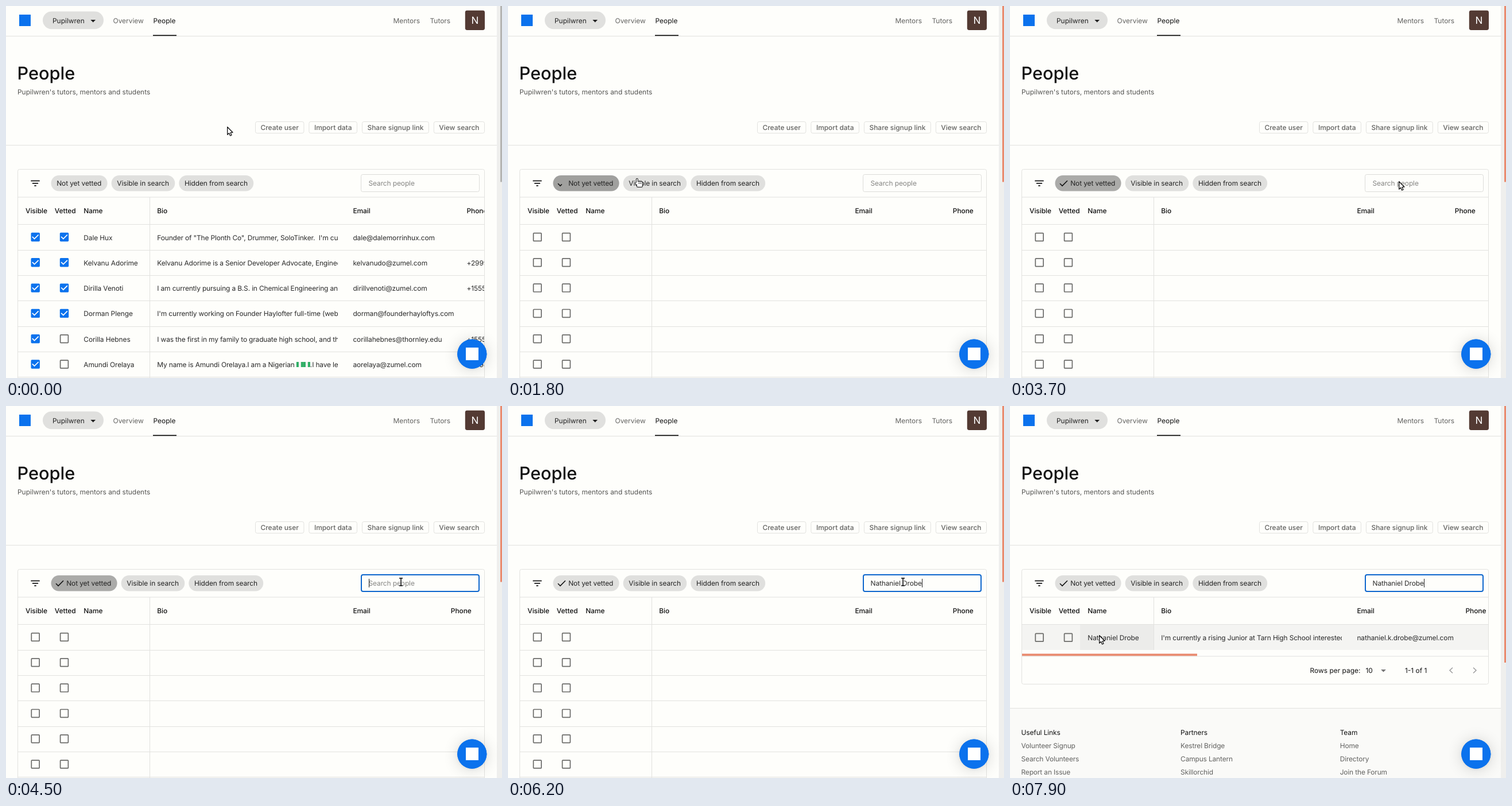
Recreate the animation shown at these times as an HTML page with a canvas. Size 864x648 px, loop 8 s.

```html
<!DOCTYPE html>
<html lang="en">
<head>
<meta charset="utf-8">
<title>People</title>
<style>
  html, body { margin: 0; width: 100%; height: 100%; overflow: hidden; background: #fefefb; }
  canvas { display: block; width: 864px; height: 648px; }
</style>
</head>
<body>
<canvas id="stage" width="864" height="648"></canvas>
<script>
const ctx = document.getElementById('stage').getContext('2d');
const LOOP = 8000, STEP = 100;
const SELECTED = 1800, FOCUSED = 4400, TYPING = 5200, FOUND = 7000;
const BG = '#fefefb', LINE = '#e2e2df', CHIP = '#e0e0de', BLUE = '#0b72ed';
const INK = '#111', BODY = '#2a2a2a', GREY = '#626260', ACCENT = '#e98a6e';
const LEFT = 20, RIGHT = 834, PAGE = 855, ROW = 44.3, ROW_TOP = 380;
const COL = { visible: 34, vetted: 84.8, name: 135.3, bio: 263.3, email: 604.4 };

const PEOPLE = [
  { name: 'Dale Hux', vetted: true, phone: '', email: 'dale@dalemorrinhux.com',
    bio: 'Founder of "The Plonth Co", Drummer, SoloTinker.  I\'m currently' },
  { name: 'Kelvanu Adorime', vetted: true, phone: '+2999', email: 'kelvanudo@zumel.com',
    bio: 'Kelvanu Adorime is a Senior Developer Advocate, Engineer' },
  { name: 'Dirilla Venoti', vetted: true, phone: '+1555', email: 'dirillvenoti@zumel.com',
    bio: 'I am currently pursuing a B.S. in Chemical Engineering and am' },
  { name: 'Dorman Plenge', vetted: true, phone: '', email: 'dorman@founderhayloftys.com',
    bio: "I'm currently working on Founder Haylofter full-time (web and" },
  { name: 'Corilla Hebnes', vetted: false, phone: '+1555', email: 'corillahebnes@thornley.edu',
    bio: 'I was the first in my family to graduate high school, and this' },
  { name: 'Amundi Orelaya', vetted: false, phone: '+2994', email: 'aorelaya@zumel.com',
    bio: 'My name is Amundi Orelaya.I am a Nigerian ', flags: 2, rest: '.I have learned' }
];
const MATCH = { name: 'Nathaniel Drobe', phone: '', email: 'nathaniel.k.drobe@zumel.com',
  bio: "I'm currently a rising Junior at Tarn High School interested" };
const LINKS = [
  ['Useful Links', 'Volunteer Signup', 'Search Volunteers', 'Report an Issue'],
  ['Partners', 'Kestrel Bridge', 'Campus Lantern', 'Skillorchid'],
  ['Team', 'Home', 'Directory', 'Join the Forum']
];

const HOME = { x: 385, y: 210 };
const MOVES = [
  { from: 100, to: 400, x: 375, y: 217 },
  { from: 900, to: 1200, x: 156, y: 308 },
  { from: 1700, to: 2000, x: 429, y: 281 },
  { from: 2100, to: 2600, x: 677, y: 305 },
  { from: 4100, to: 4200, x: 688, y: 306 },
  { from: 6700, to: 7600, x: 155, y: 399 }
];

const ramp = (t, from, to) => Math.min(1, Math.max(0, (t - from) / (to - from)));
const ease = p => p * p * (3 - 2 * p);

function pointerAt(t) {
  return MOVES.reduce((pos, m) => {
    const p = ease(ramp(t, m.from, m.to));
    return { x: pos.x + (m.x - pos.x) * p, y: pos.y + (m.y - pos.y) * p };
  }, HOME);
}

function chipShade(t) {
  if (t >= 5000) return 224;
  return 224 - 18 * ramp(t, 1100, 1200) - 46 * ramp(t, 1400, 1800) + 11 * ramp(t, 2100, 2300);
}

function typedAt(t) {
  if (t < TYPING) return '';
  const extra = MATCH.name.length - 2;
  return MATCH.name.slice(0, 2 + Math.floor(extra * ramp(t, TYPING, TYPING + 1000)));
}

const TIGHT = { gap: -0.1 };
const CELL = { gap: -0.15 };
const HEAD = { weight: 500, gap: -0.06 };
const MEDIUM = { weight: 500 };

function setFont({ size = 11.95, weight = 400, gap = 0 } = {}) {
  ctx.font = `${weight} ${size}px Inter, sans-serif`;
  ctx.letterSpacing = gap + 'px';
}
function widthOf(s, style) {
  setFont(style);
  return ctx.measureText(s).width;
}
function text(s, x, y, color = BODY, style) {
  setFont(style);
  ctx.fillStyle = color;
  ctx.fillText(s, x, y);
  return x + ctx.measureText(s).width;
}
function rect(x, y, w, h, color) {
  ctx.fillStyle = color;
  ctx.fillRect(x, y, w, h);
}
function round(x, y, w, h, r, fill, stroke, lineWidth = 1) {
  ctx.beginPath();
  ctx.roundRect(x, y, w, h, r);
  if (fill) { ctx.fillStyle = fill; ctx.fill(); }
  if (stroke) { ctx.strokeStyle = stroke; ctx.lineWidth = lineWidth; ctx.stroke(); }
}
function poly(points, { fill, stroke, width = 1, close = false }) {
  ctx.beginPath();
  points.forEach(([x, y]) => ctx.lineTo(x, y));
  if (close) ctx.closePath();
  if (fill) { ctx.fillStyle = fill; ctx.fill(); }
  if (stroke) { ctx.strokeStyle = stroke; ctx.lineWidth = width; ctx.stroke(); }
}
function clipped(x, y, w, h, draw) {
  ctx.save();
  ctx.beginPath();
  ctx.rect(x, y, w, h);
  ctx.clip();
  draw();
  ctx.restore();
}
const triangle = (x, y, color) =>
  poly([[x - 4.4, y], [x + 4.4, y], [x, y + 4.4]], { fill: color });
const chevron = (x, y, dir) =>
  poly([[x - 2.5 * dir, y - 4.8], [x + 2.5 * dir, y], [x - 2.5 * dir, y + 4.8]],
    { stroke: '#999', width: 1.4 });

function header() {
  rect(0, 52, PAGE, 1, LINE);
  rect(23, 15, 20, 20, BLUE);
  round(64, 9.5, 106, 30.7, 15.35, CHIP);
  text('Pupilwren', 81, 30, '#222');
  triangle(151.7, 24, '#222');
  text('Overview', 186.5, 30, GREY);
  text('People', 256.5, 30, INK);
  rect(256, 50.4, 41, 1.7, INK);
  text('Mentors', 674.5, 30, GREY);
  text('Tutors', 738.5, 30, GREY);
  round(799.8, 7.8, 34.2, 34.2, 3.4, '#533a33');
  text('N', 810.4, 31.3, '#fff', { size: 17.1 });

  text('People', 19.5, 128, INK, { size: 30.7, weight: 500 });
  text("Pupilwren's tutors, mentors and students", 20, 154.3, '#555553');
  let x = RIGHT - 0.5;
  for (const label of ['View search', 'Share signup link', 'Import data', 'Create user']) {
    const w = widthOf(label, MEDIUM) + 18;
    x -= w;
    round(x, 201.5, w, 20, 3, null, LINE);
    text(label, x + 9, 216, GREY, MEDIUM);
    x -= 9;
  }
  rect(0, 242, PAGE, 1, LINE);
}

function scrollbar(t) {
  rect(PAGE, 0, 9, 648, '#efefed');
  rect(861, 0, 3, t < FOUND ? 306.5 : 447, t < 700 ? '#b4b4b2' : ACCENT);
}

function toolbar(t) {
  [15.4, 10.2, 3.4].forEach((w, i) => rect(51 - w / 2, 303.7 + 4.3 * i, w, 1.7, INK));

  const selected = t >= SELECTED, shade = Math.round(chipShade(t));
  let x = 78.5;
  ['Not yet vetted', 'Visible in search', 'Hidden from search'].forEach((label, i) => {
    const indent = i === 0 && selected ? 27 : 10;
    const w = widthOf(label, TIGHT) + indent + 10;
    round(x, 295, w, 27.4, 13.7, i ? CHIP : `rgb(${shade},${shade},${shade - 2})`);
    text(label, x + indent - 0.3, 313, '#222', TIGHT);
    x += w + 7;
  });
  if (selected) {
    const reach = 9 * (0.2 + 0.8 * ramp(t, 1700, 2400));
    poly([[87, 309.3], [91, 313.3], [91 + reach, 313.3 - reach]], { stroke: INK, width: 1.6 });
  }

  const focus = t >= FOCUSED, inset = focus ? 0.5 : 0, typed = typedAt(t);
  round(618.5 + inset, 293.5 + inset, 206 - 2 * inset, 30 - 2 * inset, 3, null,
    focus ? '#0d66cd' : '#dcdcd9', focus ? 2 : 1);
  if (!typed) text('Search people', 631.5, 313, '#858583', TIGHT);
  const end = text(typed, 631.5, 313, BODY, TIGHT);
  if (focus) rect(Math.round(end), 301, 1, 15, '#222');
}

function checkbox(cx, cy, checked) {
  if (!checked) {
    round(cx - 6.9, cy - 6.9, 13.8, 13.8, 1, null, '#6b6b69', 1.7);
    return;
  }
  round(cx - 7.7, cy - 7.7, 15.4, 15.4, 1.7, BLUE);
  poly([[cx - 5.4, cy - 0.6], [cx - 1.7, cy + 3.1], [cx + 5.4, cy - 4]],
    { stroke: '#fff', width: 1.7 });
}

function flag(x, y) {
  rect(x, y, 12, 9, '#2fae66');
  rect(x + 4, y, 4, 9, '#f4f4f2');
}

function cells(p, y, phoneX) {
  text(p.name, COL.name, y, BODY, TIGHT);
  clipped(251, y - 20, 327, 30, () => {
    let x = text(p.bio, COL.bio, y, BODY, CELL);
    for (let i = 0; i < (p.flags || 0); i++, x += 12) flag(x, y - 9);
    if (p.rest) text(p.rest, x, y, BODY, CELL);
  });
  text(p.email, COL.email, y, BODY, TIGHT);
  text(p.phone, phoneX, y, BODY, TIGHT);
}

function columns(phoneX) {
  for (const [key, x] of Object.entries({ ...COL, phone: phoneX })) {
    text(key[0].toUpperCase() + key.slice(1), x, 361.4, INK, HEAD);
  }
}

function list(loading) {
  const phoneX = loading ? 774.8 : 802.5;
  clipped(LEFT, 333, RIGHT - LEFT - 1, 315, () => {
    columns(phoneX);
    PEOPLE.forEach((p, i) => {
      const cy = 402.5 + ROW * i;
      checkbox(51.2, cy, !loading);
      checkbox(101.5, cy, !loading && p.vetted);
      if (!loading) cells(p, cy + 5, phoneX);
      rect(LEFT, Math.round(ROW_TOP + 0.4 + ROW * (i + 1)), RIGHT - LEFT, 1, LINE);
    });
  });
  rect(250, 333, 1, 315, LINE);
  round(20.5, 284.5, 813, 400, 3, null, LINE);
}

function result({ x, y }) {
  const hover = y > ROW_TOP && y < ROW_TOP + ROW;
  if (hover) rect(21, 381, 812, 44, '#f4f4f2');
  if (hover && x > 122 && x < 250) rect(122, 381, 128, 44, '#ececea');
  clipped(LEFT, 333, RIGHT - LEFT - 1, 93, () => {
    columns(793.5);
    checkbox(51.2, 403.3, false);
    checkbox(101.5, 403.3, false);
    cells(MATCH, 407.5, 793.5);
  });
  rect(250, 333, 1, 92, LINE);
  rect(20.5, 431.5, 305.5, 4, ACCENT);
  rect(LEFT, 435.5, RIGHT - LEFT, 1, LINE);
  text('Rows per page:', 522.5, 465, INK);
  text('10', 619.5, 465, INK);
  triangle(650.5, 459, '#777');
  text('1-1 of 1', 688, 465, INK);
  chevron(768.5, 460.5, -1);
  chevron(809.5, 460.5, 1);
  round(20.5, 284.5, 813, 200, 3, null, LINE);

  rect(0, 526, PAGE, 122, '#fafaf8');
  rect(0, 526, PAGE, 1, LINE);
  LINKS.forEach(([title, ...items], col) => {
    const left = 19.5 + 277.6 * col;
    text(title, left, 572.7, INK, TIGHT);
    items.forEach((s, i) => text(s, left, 595.8 + 23.05 * i, GREY, CELL));
  });
}

function launcher() {
  const glow = (blur, offset, alpha) => {
    ctx.save();
    ctx.shadowColor = `rgba(0,0,0,${alpha})`;
    ctx.shadowBlur = blur;
    ctx.shadowOffsetY = offset;
    ctx.beginPath();
    ctx.arc(811.8, 606.2, 25.6, 0, Math.PI * 2);
    ctx.fillStyle = BLUE;
    ctx.fill();
    ctx.restore();
  };
  glow(27, 1.7, 0.16);
  glow(5, 0.9, 0.06);
  rect(801, 595, 22, 22, '#fff');
}

function hand() {
  for (const [grow, color] of [[1, INK], [0, '#fff']]) {
    const part = (x, y, w, h) =>
      round(x - grow, y - grow, w + 2 * grow, h + 2 * grow, 1.5 + grow, color);
    part(-3, 0, 2, 10);
    part(-4, 6, 4, 4);
    part(-2, 5, 9, 9);
  }
  [1, 4].forEach(x => rect(x, 6, 1, 3, INK));
}

function beam() {
  for (const [color, width] of [['#fff', 3.4], [INK, 1.6]]) {
    for (const y of [-6, 7]) poly([[-3, y], [3, y]], { stroke: color, width });
    poly([[0, -6], [0, 7]], { stroke: color, width });
  }
}

function arrow() {
  poly([[0.7, 0.8], [0.7, 14.2], [3.6, 11.4], [5.6, 16], [8, 15], [6, 10.6], [10, 10.2]],
    { fill: '#fff', stroke: INK, width: 1.3, close: true });
}

function pointer(t, { x, y }) {
  ctx.save();
  ctx.translate(x, y);
  ctx.lineJoin = 'round';
  if (t >= 1200 && t < 1900) hand();
  else if (t >= 4200 && t < 6900) beam();
  else arrow();
  ctx.restore();
}

function draw(t) {
  const pos = pointerAt(t);
  rect(0, 0, 864, 648, BG);
  header();
  scrollbar(t);
  if (t >= FOUND) result(pos);
  else list(t >= SELECTED);
  rect(LEFT, 332.5, RIGHT - LEFT, 1, LINE);
  rect(LEFT, ROW_TOP, RIGHT - LEFT, 1, LINE);
  toolbar(t);
  launcher();
  pointer(t, pos);
}

ctx.textRendering = 'geometricPrecision';
const start = performance.now();
function tick() {
  const t = (performance.now() - start) % LOOP;
  draw(Math.floor(t / STEP) * STEP);
  requestAnimationFrame(tick);
}
tick();
</script>
</body>
</html>
```
